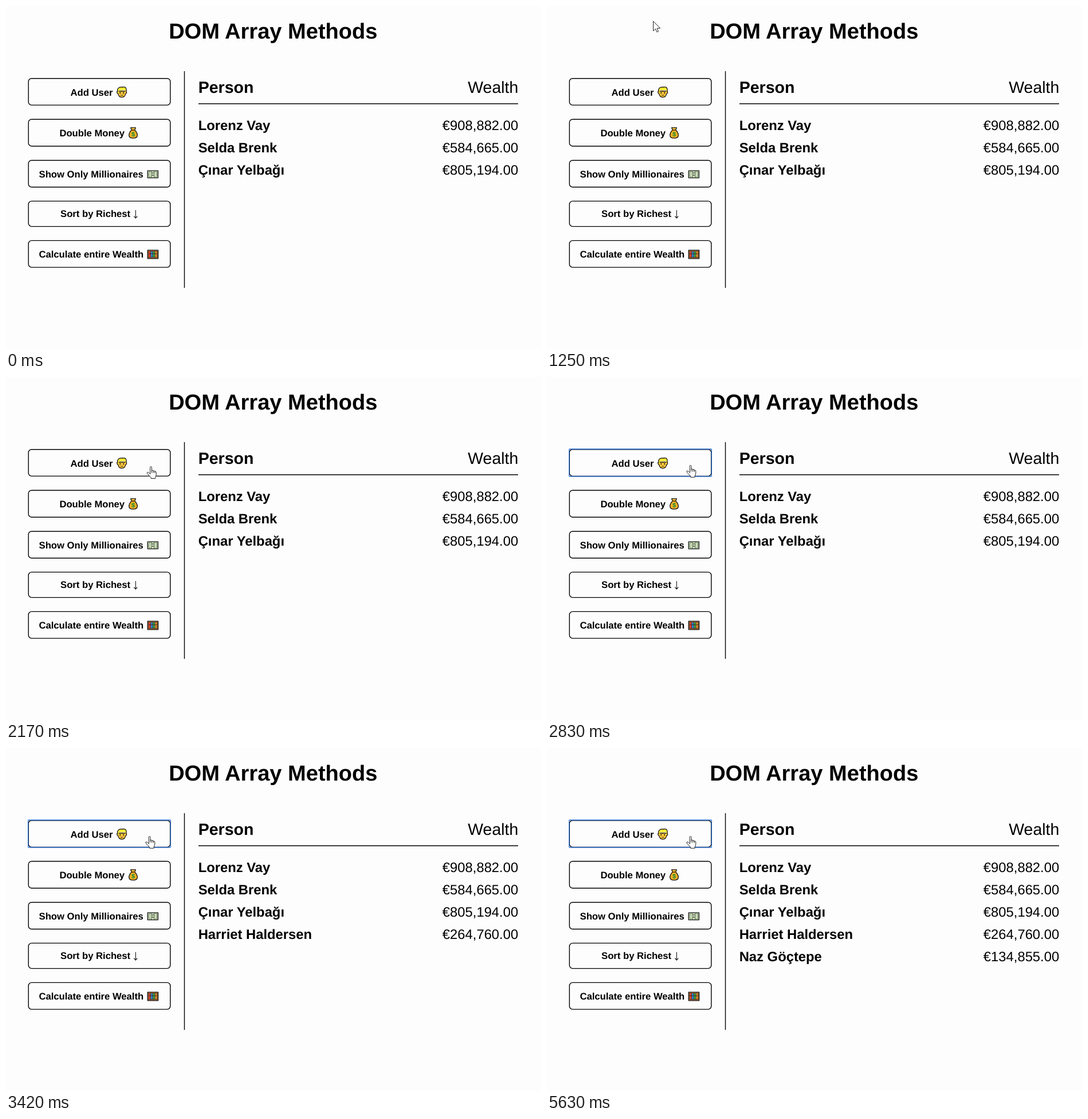
Write an HTML page that moves like this. It is 934 px wide and 600 px high and loops after 8 s.

```html
<!DOCTYPE html>
<html lang="en">
<head>
<meta charset="utf-8">
<title>DOM Array Methods</title>
<style>
  html, body { margin: 0; width: 100%; height: 100%; overflow: hidden; background: #fdfdfe; }
  svg { display: block; width: 934px; height: 600px; }
  text { font-family: "Liberation Sans", Arial, sans-serif; fill: #000; text-rendering: geometricPrecision; }
  .title { font-size: 38.05px; font-weight: bold; text-anchor: middle; }
  .head { font-size: 28.5px; }
  .row { font-size: 23.8px; }
  .label { font-size: 16.65px; font-weight: bold; }
  .bold { font-weight: bold; }
  .end { text-anchor: end; }
  .line { stroke: #000; stroke-width: 1.4; fill: none; }
  .ink { stroke: #111; stroke-width: 1.3; stroke-linejoin: round; }
  .cursor { fill: #fff; stroke: #222; stroke-width: 1; stroke-linejoin: round; stroke-linecap: round; }
</style>
</head>
<body>
<svg viewBox="0 0 934 600">
  <text class="title" x="466.3" y="57">DOM Array Methods</text>
  <g id="buttons"></g>
  <rect id="ring" x="38.6" y="126" width="248.8" height="48" rx="1" fill="none" stroke="#2f74d8" stroke-width="1.3"/>
  <path class="line" d="M311.5 114V493M336 171H894"/>
  <text class="head bold" x="335.7" y="152">Person</text>
  <text class="head end" x="894.4" y="152">Wealth</text>
  <g id="rows"></g>

  <!-- blond person -->
  <g transform="translate(193 141)">
    <path class="ink" fill="#ffc83d" d="M2.2 8Q.6 8 .7 10Q.9 12 2.6 12.4Q3.8 18.6 9.2 18.6Q14.6 18.6 15.8 12.4Q17.5 12 17.6 10Q17.6 8 16.2 8Z"/>
    <path fill="#fdea35" d="M2.2 10Q.6 4.4 4 2Q6.4 .3 9.8 1Q13 .2 15.4 1.4Q18.3 4 16.2 10Q15.4 7.6 13.6 5.8Q9 7.4 5 6.2Q4 8.4 2.2 10Z"/>
    <path class="ink" fill="none" d="M1.8 8.6Q.8 4.2 4 2Q6.4 .3 9.8 1Q13 .2 15.4 1.4Q17.9 4 16.7 8.6"/>
    <circle cx="6.3" cy="11" r="1.1"/><circle cx="12.1" cy="11" r="1.1"/>
    <path d="M7 14.8Q9.2 16 11.4 14.8" fill="none" stroke="#111" stroke-width="1"/>
  </g>

  <!-- money bag -->
  <g transform="translate(214 212)">
    <path class="ink" fill="#f7b024" d="M5 5.2Q.7 9.5 .7 14Q.8 19.2 8 19.2Q15.3 19.2 15.3 14Q15.3 9.5 11 5.2Z"/>
    <path class="ink" fill="#ffc83d" d="M3.6 .8H12.4L10.8 4.8H5.2Z"/>
    <path d="M4.4 5.2H11.6" stroke="#7a4a12" stroke-width="1.4"/>
    <text x="8" y="16.2" text-anchor="middle" style="font-size:11px;font-weight:bold;fill:#138a36">$</text>
  </g>

  <!-- banknote -->
  <g transform="translate(246.5 287.5)">
    <rect class="ink" x=".7" y=".7" width="18.2" height="12.4" fill="#d3dfc2"/>
    <path d="M2.6 2.6H5.4M2.6 11.2H5.4M14.2 2.6H17M14.2 11.2H17M2.8 3V10.8M16.8 3V10.8" stroke="#5d8050" stroke-width="1"/>
    <path d="M7.2 1.4V4M12.4 1.4V4M7.2 9.4V12.4M12.4 9.4V12.4" stroke="#39542c" stroke-width="1"/>
    <circle cx="9.8" cy="6.6" r="2.8" fill="#f2f6ea" stroke="#39542c"/>
    <path d="M9.8 4.6V9" stroke="#39542c"/>
  </g>

  <path d="M226.3 357V371M223.3 367.6L226.3 371.2L229.3 367.6" fill="none" stroke="#111" stroke-width="1.1"/>

  <!-- abacus -->
  <g transform="translate(246.5 426.5)">
    <rect class="ink" x=".7" y=".7" width="18.4" height="14.6" fill="#a5632f"/>
    <rect x="2.5" y="2.5" width="14.8" height="11" fill="#3b2a22"/>
    <g id="beads" stroke-width="2.7"></g>
  </g>

  <path id="arrow" class="cursor" d="M0 0V16.6L3.9 13L6.4 18.6L8.9 17.5L6.5 12H11.8Z"/>
  <g id="hand" class="cursor">
    <path d="M-1.4 1.4Q-1.4 0 0 0Q1.4 0 1.4 1.4V6.7Q4 5.8 4.2 7.5Q6.6 6.9 6.9 8.4Q9.3 8.1 9.3 10.3V13.5Q9 16.5 7.6 18.5V20.8H.2V19.1Q-3.4 15.5 -6.6 11.5Q-7.1 9.7 -5.2 9.7Q-3.4 10.1 -1.4 12.7Z"/>
    <path fill="none" d="M1.4 6.7V10.4M4.2 7.5V10.8M6.9 8.4V11"/>
  </g>
</svg>
<script>
const LOOP = 8000;
const byId = id => document.getElementById(id);

function add(parent, tag, attrs, text = "") {
  const el = document.createElementNS("http://www.w3.org/2000/svg", tag);
  for (const key in attrs) el.setAttribute(key, attrs[key]);
  el.textContent = text;
  parent.append(el);
  return el;
}

// label, label x, baseline, top and height of the box
const buttons = [
  ["Add User", 112.6, 156.8, 126.7, 46.7],
  ["Double Money", 93.4, 228, 198.2, 47],
  ["Show Only Millionaires", 57.6, 300, 270, 46.8],
  ["Sort by Richest", 95.1, 368.5, 341.4, 44.2],
  ["Calculate entire Wealth", 57.4, 440.3, 410.4, 46.7],
];
for (const [label, x, base, top, height] of buttons) {
  add(byId("buttons"), "rect", { class: "line", x: 39.2, y: top, width: 247.6, height, rx: 5.5 });
  add(byId("buttons"), "text", { class: "label", x, y: base }, label);
}

// name, wealth, time of appearance
const people = [
  ["Lorenz Vay", 908882, 0],
  ["Selda Brenk", 584665, 0],
  ["Çınar Yelbağı", 805194, 0],
  ["Harriet Haldersen", 264760, 3130],
  ["Naz Göçtepe", 134855, 5420],
];
const euros = n => "€" + n.toLocaleString("en-US", { minimumFractionDigits: 2 });
const rows = people.map(([name, wealth, start], i) => {
  const el = add(byId("rows"), "g", {});
  const y = 217.2 + 39 * i;
  add(el, "text", { class: "row bold", x: 335.7, y }, name);
  add(el, "text", { class: "row end", x: 894.2, y }, euros(wealth));
  return { el, start };
});

["#e8443a", "#2f8fe0", "#35b04a", "#f0982c"].forEach((stroke, i) => {
  const x = 4.3 + 3.7 * i;
  add(byId("beads"), "path", { stroke, d: `M${x} 3V6.4M${x} 7.4V12.8` });
});

// time, tip x, tip y
const path = [
  [1080, 4, 40], [1250, 185.5, 27], [1450, 222, 50], [1700, 240, 118],
  [1880, 246.5, 159], [2170, 253, 156.8], [2380, 250.5, 154.5],
];
const ENTER = 1080, HOVER = 1730, PRESS = 2790;

function tipAt(t) {
  const i = path.findIndex(p => p[0] > t);
  if (i === 0) return path[0].slice(1);
  if (i < 0) return path[path.length - 1].slice(1);
  const [t0, x0, y0] = path[i - 1], [t1, x1, y1] = path[i];
  const k = (t - t0) / (t1 - t0);
  return [x0 + (x1 - x0) * k, y0 + (y1 - y0) * k];
}

const show = (el, on) => el.style.display = on ? "" : "none";

function draw(t) {
  const [x, y] = tipAt(Math.floor((t - 10) / 40) * 40 + 10);
  for (const id of ["arrow", "hand"]) byId(id).setAttribute("transform", `translate(${x} ${y})`);
  show(byId("arrow"), t >= ENTER && t < HOVER);
  show(byId("hand"), t >= HOVER);
  show(byId("ring"), t >= PRESS);
  rows.forEach(r => show(r.el, t >= r.start));
}

const begin = performance.now();
function tick() {
  draw((performance.now() - begin) % LOOP);
  requestAnimationFrame(tick);
}
tick();
</script>
</body>
</html>
```
